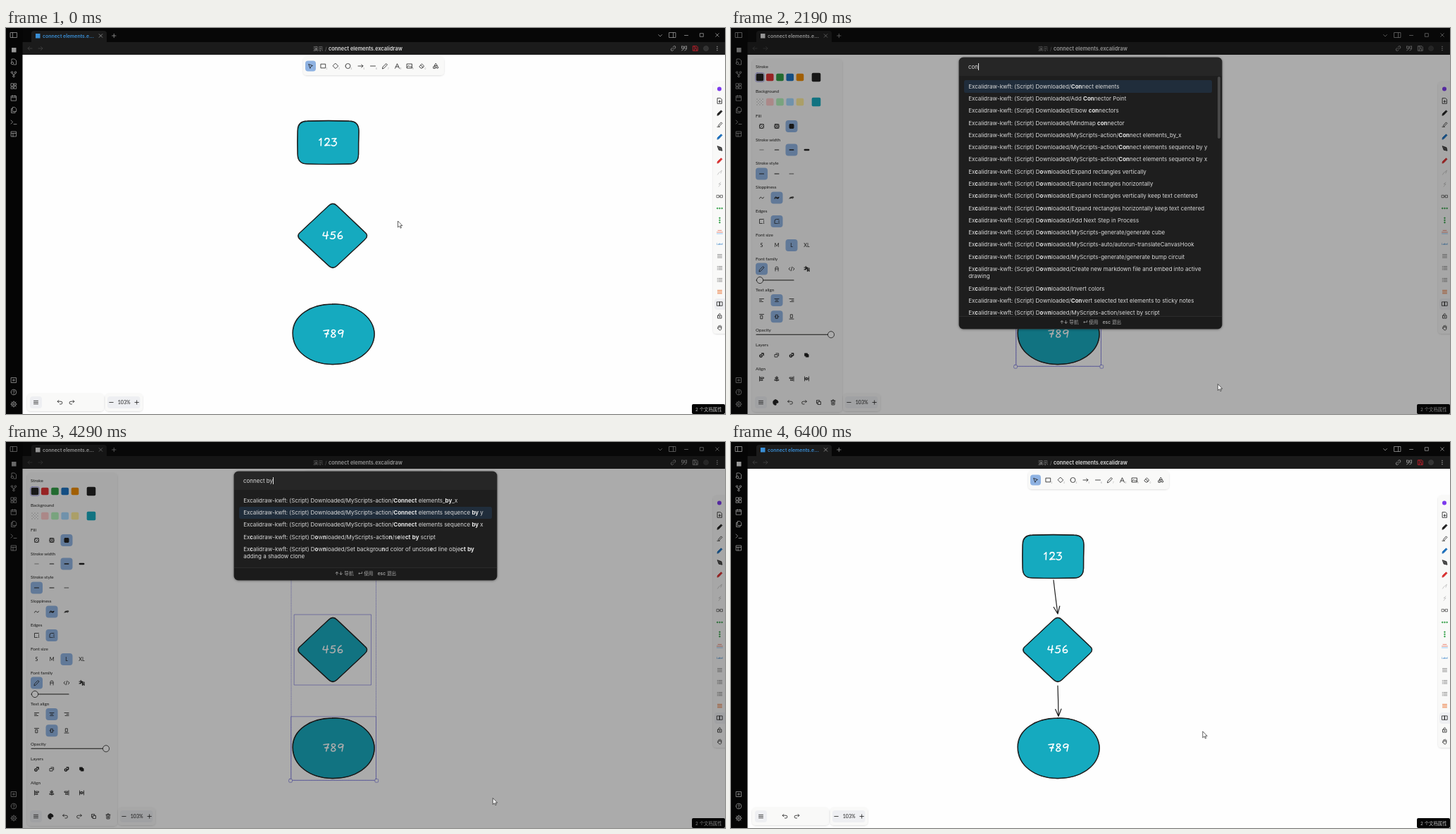
Write an HTML page that moves like this. It is 1021x548 px and loops after 6.78 s.

```html
<!DOCTYPE html>
<html lang="zh">
<head>
<meta charset="utf-8">
<title>connect elements</title>
<style>
html, body { margin: 0; width: 100%; height: 100%; overflow: hidden; background: #fff; }
body { position: relative; font-family: Inter, "Noto Sans CJK SC", "Noto Sans CJK", sans-serif; }
svg { position: absolute; left: 0; top: 0; }
#dim { position: absolute; inset: 0; background: rgba(10, 10, 10, .34); }
#modal { position: absolute; left: 324px; top: 42px; width: 373px; border-radius: 6px; overflow: hidden;
  background: #1e1e1e; color: #dadada; font-size: 7.98px; line-height: 10.4px;
  box-shadow: 0 0 0 .5px #3a3a3a, 0 .5px 3.5px rgba(0, 0, 0, .6); }
#input { height: 25.5px; line-height: 26px; padding-left: 13px; background: #262626; white-space: pre; position: relative; }
#hint { color: #6c6c6c; position: absolute; left: 13px; }
#caret { display: inline-block; width: .7px; height: 10px; margin-top: 8px; background: #e0e0e0; vertical-align: top; }
#list { position: relative; box-sizing: border-box; padding: 6.8px 7px 6.4px; max-height: 341.5px; overflow: hidden; }
#list.scroll { padding-right: 14px; }
.row { padding: 3.45px 6.2px; border-radius: 2.5px; display: flex; }
.row span { flex: 1; }
.row b { font-weight: 700; color: #e6e6e6; }
.row.on { background: #202d3b; }
kbd { font: 500 6.5px/10.4px Inter, sans-serif; background: #151515; border-radius: 2px; padding: 0 2.4px; margin-left: 1.6px; color: #eee; }
#thumb { position: absolute; right: 2px; top: 1.5px; width: 4px; border-radius: 2px; background: #484848; }
#foot { height: 17px; line-height: 17px; font-size: 6.6px; text-align: center; color: #a6a6a6; background: #1b1b1b; border-top: .5px solid #2b2b2b; }
#foot span { margin: 0 2.2px; }
#foot b { font-weight: 600; }
</style>
</head>
<body>
<svg id="app" width="1021" height="548"></svg>
<div id="dim"></div>
<div id="modal">
  <div id="input"><span id="hint">输入命令......</span><span id="query"></span><i id="caret"></i></div>
  <div id="list"></div>
  <div id="foot"><span><b>↑↓</b> 导航</span> <span><b>↵</b> 使用</span> <span><b>esc</b> 退出</span></div>
</div>
<svg width="1021" height="548"><path id="cursor" d="M0 0V9L2.2 7.1L3.7 10.2L5 9.5L3.6 6.6H6.4Z" fill="#fff" stroke="#222" stroke-width=".7"/></svg>
<script>
const LOOP = 6780, ACCENT = '#8eb2e2', INK = '#1e1e1e', TEAL = '#15aabf', VIOLET = '#6965db', BUTTON = '#eeeff2';
const $ = id => document.getElementById(id);

// Drawing helpers; icon paths are centred on 0,0.
const ring = (r, x = 0, y = 0) => `M${x - r} ${y}a${r} ${r} 0 1 0 ${2 * r} 0a${r} ${r} 0 1 0 ${-2 * r} 0`;
const box = (x, y, w, h, fill, r = 0, more = '') => `<rect x="${x}" y="${y}" width="${w}" height="${h}" rx="${r}" fill="${fill}" ${more}/>`;
const icon = (x, y, d, color = INK, w = .8, fill = 'none', flip = 1) =>
  `<path transform="translate(${x} ${y}) scale(${flip} 1)" d="${d}" stroke="${color}" stroke-width="${w}" fill="${fill}"/>`;
const text = (x, y, s, size, fill = INK, more = '') => `<text x="${x}" y="${y + size * .36}" font-size="${size}" fill="${fill}" ${more}>${s}</text>`;
const island = (x, y, w, h) => box(x, y, w, h, '#f9f9f8', 5, 'filter="url(#soft)"');
const group = (id, s) => `<g id="${id}">${s}</g>`;

const SIDE = 'M-4.5-3.5H4.5V3.5H-4.5ZM-1.5-3.5V3.5';
const SQUARE = 'M-2-3H2Q3-3 3-2V2Q3 3 2 3H-2Q-3 3-3 2V-2Q-3-3-2-3Z';
const PENCIL = 'M-3.5 3.5L-3 1.2L2-3.5L3.5-2L-1.2 3Z';
const CROSS = 'M-2.3-2.3L2.3 2.3M2.3-2.3L-2.3 2.3';
const LINES = 'M-3-2.2H3M-3 0H3M-3 2.2H3';
const PLUS = 'M-2.7 0H2.7M0-2.7V2.7';

function chrome() {
  const grey = '#989898';
  let s = box(0, 0, 1021, 38, '#070707') + box(0, 0, 23.5, 548, '#050505') +
    box(23.5, 20, 998, 18, '#1b1b1b') + `<path d="M36 20V8q0-4 4-4H139q4 0 4 4V20Z" fill="#1b1b1b"/>`;
  const ribbon = [
    [10, SIDE],
    [48, 'M-3 1V-4H1L3.5-2V4H0' + ring(1.8, -2, 2)],
    [65.5, ring(1.3, -2.5, -2.5) + ring(1.3, 2.5, -2.5) + ring(1.3, 0, 3) + 'M-2.5-1.2Q-2.5.5 0 .5T2.5-1.2M0 .5V1.7'],
    [82.5, 'M-3.7-3.7H-.6V0H-3.7ZM.8-3.7H3.7V-1.3H.8ZM.8 0H3.7V3.7H.8ZM-3.7 1.4H-.6V3.7H-3.7Z'],
    [99.5, 'M-3.5-3H3.5V3.7H-3.5ZM-3.5-.8H3.5M-1.7-4V-2M1.7-4V-2'],
    [116.5, 'M-1.5-4H1.5L3.7-2V2H-1.5ZM-1.5-2H-3.5V4H2V2'],
    [133.5, 'M-4-2.5L-1.3 0L-4 2.5M0 3H4'],
    [150.5, 'M-3.5-3.5H3.5V3.5H-3.5ZM-3.5-1H3.5M-1-1V3.5'],
    [500, 'M-3.5-3.5H3.5V3.5H-3.5Z' + ring(1.2)],
    [517, ring(3.8) + 'M-1.2-1Q-.8-2.3.5-2T.8-.3L0 .8M0 1.8V2.3'],
    [534, ring(3.2) + ring(1.2) + 'M0-4.2V-3M0 3V4.2M-4.2 0H-3M3 0H4.2M-3-3L-2.2-2.2M3 3L2.2 2.2M3-3L2.2-2.2M-3 3L-2.2 2.2']
  ];
  for (const [y, d] of ribbon) s += icon(11, y, d, grey);
  s += box(8, 28, 6.5, 6.5, grey) + group('tab', box(42, 8, 6.5, 6.5, 'currentColor') +
    text(52, 11.5, 'connect elements.e...', 6.95, 'currentColor', 'font-weight="600"'));
  s += icon(134.5, 11, CROSS, grey) + icon(153.3, 11, PLUS, grey);
  s += icon(929, 10.5, 'M-2.5-1L0 1.5L2.5-1', grey) + icon(946, 10, SIDE, grey, .8, 'none', -1) +
    icon(966, 10.5, 'M-2.5 0H2.5', grey) + icon(988, 10, 'M-2.3-2.3H2.3V2.3H-2.3Z', grey) + icon(1010, 10, CROSS, grey);
  const back = 'M3 0H-3L-.5-2.5M-3 0L-.5 2.5';
  s += icon(34, 29, back, '#444') + icon(49, 29, back, '#444', .8, 'none', -1);
  s += text(436, 29, '演示', 7.2, '#9a9a9a') + text(453, 29, '/', 7.2, '#777') +
    text(458, 29, 'connect elements.excalidraw', 7.4, '#dcdcdc', 'font-weight="600"');
  s += icon(947.5, 29, 'M-1 1L1-1M-.5-2L1-3.4Q3.5-4 3.3-1L2 .5M.5 2L-1 3.4Q-3.5 4-3.3 1L-2-.5', grey) +
    icon(963, 29, 'M-3.5-3H-.7V0Q-1 2.5-3.5 3M-3.5-3V0H-.7M3.5-3H.7V0H3.5M3.5-3V0Q3.5 2.5.7 3', grey) +
    group('save', icon(979, 29, 'M-3.3-3.3H2L3.3-2V3.3H-3.3ZM-1.7 3.3V.5H1.7V3.3M-1.7-3.3V-1.3H1.2', 'currentColor')) +
    icon(994, 29, ring(3.5), '#3c3c3c', .8, '#333') + icon(1010, 29, ring(.4, 0, -2.7) + ring(.4) + ring(.4, 0, 2.7), grey);
  return s + box(974, 534, 47, 14, '#050505', 2) + text(979, 541.3, '2 个文档属性', 6.4, '#bdbdbd');
}

function toolbar() {
  const tools = [
    [432.5, 'M-2.5-2.5L3-.5L.5.5L-.5 3Z'], [450.5, 'M-3.2-2.8H3.2V2.8H-3.2Z'], [468, 'M0-3.7L3.7 0L0 3.7L-3.7 0Z'],
    [485.5, ring(3.5)], [503.5, 'M-3.5 0H3.5L1.3-2M3.5 0L1.3 2'], [521, 'M-3.5 0H3.5'], [538, PENCIL],
    [555.5, 'M-3 3.3L0-3.3L3 3.3M-1.8 1H1.8'], [573, 'M-3.5-3H3.5V3H-3.5ZM-3.5 1.5L-1-.5L1 1.5L2 .5L3.5 2'],
    [590.5, 'M-3.5.5L0-3L3.2 0L.5 3H-1ZM-1.7-1.2L1.7 1.8'], [610.5, 'M0-3.5L2-.5H-2ZM-3.3.8H-.8V3.3H-3.3Z' + ring(1.3, 2, 2)]
  ];
  let s = island(422, 41, 200, 26) + box(425, 46.5, 15, 15, ACCENT, 4);
  tools.forEach(([x, d], i) => {
    s += icon(x, 54, d);
    if (i < 10) s += text(x + 4, 57.5, (i + 1) % 10, 3, '#999');
  });
  return s;
}

function sideTools() {
  const dots = [-3.2, 0, 3.2];
  const bullets = 'M-1.3-2.2H3.3M-1.3 0H3.3M-1.3 2.2H3.3M-3.3-2.2H-2.5M-3.3 0H-2.5M-3.3 2.2H-2.5';
  const items = [
    null, ['M-3-3.8H1L3-2V3.8H-3ZM0-.8V2.4M-1.6.8H1.6', INK], [PENCIL, INK, INK], ['M-3.5 3H0M-2 1L2-3.5L3.5-2L-.5 2Z', INK],
    [PENCIL, '#1864ab', '#1971c2'], ['M-3-3.5L2.5-1.5L3.5 3L-1 2Z' + ring(.8), INK, '#555'], [PENCIL, '#c92a2a', '#e03131'],
    ['M-3 3L-1 0M0-.5L3-3L1.5 1', '#bbb'], ['M1.5-3L-1.5-.5H1.5L-1.5 3', '#bbb'], ['M-4-1.7H-1V1.7H-4ZM1-1.7H4V1.7H1ZM-1 0H1', '#555'],
    [dots.map(v => ring(.8, v, 0)).join(''), '#2f9e44', '#2f9e44'], [dots.map(v => ring(.8, 0, v)).join(''), '#2f9e44', '#2f9e44'],
    ['M-2.5-2.5H2.5M-4 0H4', '#e8705a'], null, [LINES, '#777'], [bullets, '#777'], [bullets, '#777'],
    [LINES, '#e8590c'], ['M-3.7-2.7H0V2.7H-3.7ZM0-2.7H3.7V2.7H0Z', INK],
    ['M-2.5-.5H2.5V3.5H-2.5ZM-1.5-.5V-2Q0-4.5 1.5-2' + ring(.4, 0, 1.5), INK],
    ['M-2.5.5V-1.5M-1-.5V-3M.7-.5V-3.4M2.3 0V-2.3M-2.5.5Q-4 0-2 2Q-1 3.5 1 3.4Q3 3 2.3 0', INK]
  ];
  let s = island(1004, 76, 24, 358) + box(1006, 384, 17, 16, BUTTON, 4) + `<circle cx="1013" cy="86.5" r="3" fill="#7c3aed"/>`;
  items.forEach((it, i) => { if (it) s += icon(1013.5, 86.5 + i * 16.95, it[0], it[1], .8, it[2]); });
  return s + text(1009, 307, 'Label', 3.4, '#1971c2') + icon(1013.5, 290, 'M-4 2H4', '#4dabf7', .6);
}

function panel() {
  const cols = [43.5, 65, 86, 107.5];
  const label = (y, s) => text(35, y, s, 6.35, INK, 'font-family="Lato, sans-serif"');
  const wave = 'M-3 1.2Q-1.5-2.5 0 0T3-.8', dash = 'M-3 0h1.6m.7 0h1.6m.7 0h1.4', dotty = 'M-3 0h.6m.7 0h.6m.7 0h.6m.7 0h.6m.7 0h.6';
  const hatch = 'M-3 0L0-3M-2.5 2.5L2.5-2.5M0 3L3 0', cross = hatch + 'M-2.5-2.5L2.5 2.5M0-3L3 0M-3 0L0 3';
  const arm = 'M-3 3V-3H3', arc = 'M-3 3V-.5Q-3-3-.5-3H3', rest = 'M3-1V0M3 1.5V3M1 3H0M-1 3H-2';
  const duo = ring(1.7, -1, 1) + 'M0-2.5H2.7V.3';
  const sections = [
    ['Fill', 124.5, 139.5, 2, [[SQUARE + hatch], [SQUARE + cross], [SQUARE, 1, INK]]],
    ['Stroke width', 158.5, 173, 2, [['M-2.7 0H2.7', .5], ['M-2.7 0H2.7', 1.2], ['M-2.7 0H2.7', 1.6], ['M-2.7 0H2.7', 2.5]]],
    ['Stroke style', 192, 207, 0, [['M-3 0H3', 1.1], [dash, 1], [dotty, .7]]],
    ['Sloppiness', 226, 241, 1, [[wave], [wave + 'L-1 .8', 1.1], [wave + 'Q-1-2-2 1L2-1', .9]]],
    ['Edges', 260, 274.5, 1, [[arm + rest], [arc + rest]]],
    ['Font size', 293.5, 308.5, 2, ['S', 'M', 'L', 'XL']],
    ['Font family', 327.5, 342, 0, [[PENCIL], ['M-2 3V-1.5Q-2-3 0-3T2-1.5V3M-2 0H2'], ['M-2.2-2L-4 0L-2.2 2M2.2-2L4 0L2.2 2M.8-2.8L-.8 2.8'], ['M-3.5-2H1M-1.2-3.8V1M-3.5 1Q0 0 .5-2M1 0L3.5 3.5M1 3.5V-1H3.5V3', 1.1]]],
    ['Text align', 372, 386.5, 1, [['M-3-2H3M-3 0H0M-3 2H2'], ['M-3-2H3M-1.5 0H1.5M-2.3 2H2.3'], ['M-3-2H3M0 0H3M-2 2H3']]],
    ['', 0, 409.8, 1, [['M-3-3.3H3M-1.3-1.5H1.3V3H-1.3Z'], ['M-3 0H-1.3M1.3 0H3M-1.3-2.5H1.3V2.5H-1.3Z'], ['M-3 3.3H3M-1.3-3H1.3V1.5H-1.3Z']]],
    ['Layers', 450, 464.5, -1, [[duo, 1.3], ['M-2.6-1H1V2.6H-2.6ZM-1-2.6H2.6V1'], [duo + 'L0 1', 1.3], ['M-1-1H2.6V2.6H-1ZM-2.6-2.6H1V1H-2.6Z', .8, INK]]],
    ['Align', 483.5, 498, -1, [['M-3-3.3V3.3M-1.5-2H3V-.5H-1.5ZM-1.5 1H1.5V2.3H-1.5Z'], ['M0-3.5V3.5M-1.7-2H1.7V-.6H-1.7ZM-2.7 1H2.7V2.4H-2.7Z'], ['M3-3.3V3.3M1.5-2H-3V-.5H1.5ZM1.5 1H-1.5V2.3H1.5Z'], ['M-3-3V3M3-3V3M-1.2-1.5H1.2V1.5H-1.2ZM-3 0H3']]]
  ];
  let s = island(30, 44, 128, 501) + label(55, 'Stroke') + label(90, 'Background') + label(429, 'Opacity');
  const swatches = (y, colors) => colors.forEach((c, i) => {
    const big = i == 5, half = big ? 6.3 : 5.3;
    s += box((big ? 121 : 41 + i * 14.25) - half, y - half, half * 2, half * 2, c, 2);
  });
  swatches(70, [INK, '#e03131', '#2f9e44', '#1971c2', '#f08c00', INK]);
  s += box(34.7, 63.7, 12.6, 12.6, 'none', 2.5, `stroke="${VIOLET}" stroke-width=".6"`);
  swatches(105, ['url(#check)', '#ffc9c9', '#b2f2bb', '#a5d8ff', '#ffec99', TEAL]);
  for (const [name, ly, y, on, icons] of sections) {
    if (name) s += label(ly, name);
    if (on >= 0) s += box(cols[on] - 8.5, y - 8.5, 17, 17, ACCENT, 4);
    icons.forEach((it, i) => s += typeof it == 'string'
      ? text(cols[i], y, it, 7.2, INK, 'text-anchor="middle" font-family="Lato, sans-serif"')
      : icon(cols[i], y, it[0], INK, it[1], it[2]));
  }
  for (const [y, end, knob] of [[358, 89, 41], [435.3, 146, 142]])
    s += icon(0, y, `M36 0H${end}`, INK, 1.1) + icon(knob, y, ring(4.6), INK, .8, '#fff');
  return s;
}

function footer(undo, redo, zoom) {
  const turn = 'M-1.7-3L-3.3-1.3L-1.7.4M-3.3-1.3H1.5a1.9 1.9 0 0 1 0 3.8H0';
  return island(zoom, 519, 53, 25) + box(zoom + 3, 523, 46.5, 17, BUTTON, 4) + box(34, 523, 17, 17, BUTTON, 4) +
    icon(undo, 531.5, turn) + icon(redo, 531.5, turn, INK, .8, 'none', -1) +
    icon(42.5, 531.5, LINES) + icon(zoom + 8.5, 531.5, 'M-2.7 0H2.7') + icon(zoom + 44.7, 531.5, PLUS) +
    text(zoom + 26.7, 531.8, '103%', 7, INK, 'text-anchor="middle" font-family="Lato, sans-serif"');
}

// Handwritten digits, about 8 by 12 units each.
const DIGITS = {
  1: 'M2 3L5 .3L4.6 11.5', 2: 'M.5 3C1-.8 7-.8 7 3C7 6 3 9 .3 11.3C3 10.3 5 10.6 8 11',
  3: 'M1 .8L7.5.3L3.5 5C8 4 9 8 7 10C5 12 2 12 0 10.5', 4: 'M1.8 1.5L0 6.3C3 7.2 6 6.5 8.3 6M7 .3L5.4 11.5',
  5: 'M8 .5L2.7 1L1.7 5C5 3.5 8 5 7.5 8C7 12 2 12 0 10.3', 6: 'M6 .2C2 2 0 6 1 9.3C2 12.5 8 11.5 7.6 8.4C7 5.5 3 6 1 8.5',
  7: 'M0 1.5C3 1 5 1 8 .5C6 4 4.5 8 4 11.5M2 6.3H7.5', 8: 'M7 2C5-.8 0 0 1.5 3.5C3 6 8 7 7 9.8C6 12.5 0 12 .5 9.3C1 6.5 7 5 7 2',
  9: 'M8 2C5-1 0 1 .5 4.5C1 7.5 6.5 6 8 2L7.3 5.5Q6.5 9 6 11.5'
};
const digits = (x, y, step, s) => [...s].map((c, i) =>
  `<path transform="translate(${x + i * step} ${y}) scale(.92)" d="${DIGITS[c]}" stroke="#fff" stroke-width="1.7" fill="none"/>`).join('');

function shapes() {
  const rough = (d, dx, dy) => `<path d="${d}" fill="${TEAL}" stroke="${INK}" stroke-width="1.3"/>
    <path d="${d}" fill="none" stroke="${INK}" stroke-width=".8" transform="translate(${dx} ${dy})"/>`;
  return rough('M428 132Q458 131 487 132Q501 132 501 146Q500.4 163 500.5 179Q500.5 193 487 193Q457 193.8 428 192.8Q414 193 414 179Q413.5 162 414 146Q414 132 428 132Z', .3, .4) +
    rough('M458 252.5Q464 246.5 470 252.5L509 289.5Q516 295 509 301L470 337.5Q464 343.5 458 337.5L418.5 301Q411 295 418.5 289.5Z', .3, -.4) +
    rough('M463 392C496 390 523 411 523 435C522 461 495 478 463 477.5C431 477 407 459 407 433C407 409 432 392 463 392Z', .5, .2) +
    digits(443, 156.5, 9.5, '123') + digits(450, 288.8, 10.3, '456') + digits(451, 428.3, 10.3, '789');
}
const arrows = ['M458 196Q460.5 218 464 244M458.2 234.5L464 244L466.8 233', 'M464 346Q464.8 368 465 389.5M460.7 379.5L465 389.5L469 379']
  .map(d => `<path d="${d}" fill="none" stroke="${INK}" stroke-width="1.2"/>`).join('');

$('app').innerHTML = `<defs>
  <filter id="soft" x="-10%" y="-20%" width="120%" height="140%"><feDropShadow dx="0" dy=".8" stdDeviation="1.2" flood-opacity=".14"/></filter>
  <pattern id="check" width="4" height="4" patternUnits="userSpaceOnUse"><path d="M0 0H4V4H0Z" fill="#fff"/><path d="M0 0H2V2H0ZM2 2H4V4H2Z" fill="#ddd"/></pattern></defs>
  <g stroke-linecap="round" stroke-linejoin="round">` +
  box(0, 0, 1021, 548, '#fefefe') + shapes() + group('arrows', arrows) + group('sel', '') +
  box(348.5, 94.5, 0, 0, 'rgba(0,0,200,.04)', 0, `id="marquee" stroke="${VIOLET}" stroke-width=".6"`) +
  toolbar() + sideTools() +
  group('idle', island(30, 519, 109, 25) + footer(76.5, 93.5, 141)) +
  group('active', panel() + footer(84, 104, 159) +
    icon(63.3, 531.5, 'M0-3.8A3.8 3.8 0 1 0 .5 3.8Q1.5 3 .7 2Q.5.8 2 .9Q4 1 3.8-.6Q3.2-3.6 0-3.8Z', INK, .8, INK) +
    icon(124.5, 531.5, 'M-1-1H3V3H-1ZM-1 1.3H-3V-3H1.3V-1') + icon(145, 531.5, 'M-3-2.3H3M-2.3-2.3L-2 3.5H2L2.3-2.3M-1-2.5V-3.6H1V-2.5M-.7-.5V2M.7-.5V2')) +
  chrome() + '</g>';

const BOXES = [[411.5, 129.5, 91, 66], [409.5, 245, 109, 100], [405, 389.8, 120.5, 90.5]];
function selection(n, settled) {
  const line = `stroke="${VIOLET}" stroke-width=".6"`, picked = BOXES.slice(0, n);
  let s = picked.map(b => box(...b, 'none', 0, line)).join('');
  if (n < 2) return s;
  const l = Math.min(...picked.map(b => b[0])), r = Math.max(...picked.map(b => b[0] + b[2]));
  const t = BOXES[0][1] - .5, b = picked[n - 1][1] + picked[n - 1][3];
  s += box(l, t, r - l, b - t, 'none', 0, `stroke="${VIOLET}" stroke-width=".9" stroke-dasharray="1 1.2" stroke-linecap="butt"`);
  if (settled) {
    for (const x of [l - 1, r + .8]) for (const y of [t - .4, b + .5]) s += box(x - 2.4, y - 2.4, 4.8, 4.8, '#fff', 1.3, line);
    s += icon((l + r) / 2, 120, ring(2.3), VIOLET, .7, '#fff');
  }
  return s;
}

// Command palette
const COMMANDS = `保存当前文件|Ctrl + S
解锁/锁定
左右分屏
上下分屏
堆叠/取消堆叠标签页
编辑文件名|F2
复制当前文件的路径
复制 Tolvaria 链接
重新打开标签页|Ctrl + Shift + T
在新窗口中打开当前面板
将当前面板移动至新窗口
转到下一个标签|Ctrl + Tab|Ctrl + Page Down
转到标签 #1|Ctrl + 1
转到最后一个标签|Ctrl + 9
转到上一个标签|Ctrl + Shift + Tab|Ctrl + Page Up
新标签页|Ctrl + T
Kanban: 创建新看板
Banners: Add/Change banner with local image
Banners: Add/Change emoji icon
Banners: Paste banner from clipboard`.split('\n');
const SCRIPTS = `Connect elements
Add Connector Point
Elbow connectors
Mindmap connector
MyScripts-action/Connect elements_by_x
MyScripts-action/Connect elements sequence by y
MyScripts-action/Connect elements sequence by x
Expand rectangles vertically
Expand rectangles horizontally
Expand rectangles vertically keep text centered
Expand rectangles horizontally keep text centered
Add Next Step in Process
MyScripts-generate/generate cube
MyScripts-auto/autorun-translateCanvasHook
MyScripts-generate/generate bump circuit
Create new markdown file and embed into active drawing
Invert colors
Convert selected text elements to sticky notes
MyScripts-action/select by script
Set background color of unclosed line object by adding a shadow clone
Normalize Selected Arrows
Change shape of selected elements
Invert selected frame contents`.split('\n').map(s => 'Excalidraw-kwft: (Script) Downloaded/' + s);

// Each word matches as a whole, or else letter by letter in order; null means no match.
function highlight(item, query) {
  const low = item.toLowerCase(), hits = new Set();
  for (const word of query.split(' ').filter(Boolean)) {
    let pos = Math.max(0, low.indexOf(word));
    for (const ch of word) {
      pos = low.indexOf(ch, pos);
      if (pos < 0) return null;
      hits.add(pos++);
    }
  }
  return [...item].map((c, i) => hits.has(i) ? `<b>${c}</b>` : c).join('').replace(/<\/b><b>/g, '');
}
function showPalette(query, picked) {
  const rows = query ? SCRIPTS.map(s => highlight(s, query)).filter(Boolean).map(s => `<span>${s}</span>`)
    : COMMANDS.map(c => c.split('|').map((p, i) => i ? `<kbd>${p}</kbd>` : `<span>${p}</span>`).join(''));
  const long = rows.length > 9;
  $('list').className = long ? 'scroll' : '';
  $('list').innerHTML = rows.map((r, i) => `<div class="row${i == picked ? ' on' : ''}">${r}</div>`).join('') +
    (long ? `<div id="thumb" style="height:${64 + 8.1 * query.length}px"></div>` : '');
  $('query').textContent = query;
  $('hint').style.display = query ? 'none' : '';
}

// Timeline: values hold until the next step.
const POINTER = [[0, 556.5, 274], [100, 470, 205], [194, 395, 132], [289, 348.5, 94.5], [383, 400, 150], [477, 510, 262],
  [571, 578, 372], [666, 650, 484], [760, 690, 524], [860, 691.5, 522], [950, 691.5, 514], [1040, 691.3, 505.5],
  [5350, 688, 480], [5447, 679, 440], [5543, 671, 410], [5640, 667.5, 397.5], [5830, 667, 405], [5927, 666.5, 412], [6400, 669.8, 410.8]];
const PICKED = [[0, 0], [477, 1], [571, 2], [666, 3], [5927, 0]];
const TYPED = [[0, 0], [1810, 1], [1910, 2], [2190, 3], [2287, 4], [2383, 5], [2480, 6], [2760, 7], [2960, 8], [3150, 9], [3240, 10]];
const at = (steps, t) => steps.filter(s => s[0] <= t).pop();
const show = (id, on) => $(id).style.display = on ? '' : 'none';
const during = (t, a, b) => t >= a && t < b;

let selKey, listKey;
function draw(t) {
  const [, x, y] = at(POINTER, t), n = at(PICKED, t)[1], open = during(t, 1620, 4570);
  $('cursor').setAttribute('transform', `translate(${x} ${y})`);
  show('marquee', during(t, 383, 950));
  $('marquee').setAttribute('width', Math.max(0, x - 348.5));
  $('marquee').setAttribute('height', Math.max(0, y - 94.5));
  show('active', n); show('idle', !n); show('arrows', t >= 4570);
  show('dim', open); show('modal', open);
  $('save').style.color = open ? '#989898' : '#d0202c';
  $('tab').style.color = open ? '#dcdcdc' : '#3a8fd6';
  $('caret').style.opacity = during(t, 3820, 4190) ? 0 : 1;
  const sk = n + '/' + (t >= 950);
  if (sk != selKey) { selKey = sk; $('sel').innerHTML = selection(n, t >= 950); }
  const query = 'connect by'.slice(0, at(TYPED, t)[1]), row = t >= 4290 ? 1 : 0;
  if (query + row != listKey) { listKey = query + row; showPalette(query, row); }
}
const start = performance.now();
function tick() {
  draw((performance.now() - start) % LOOP);
  requestAnimationFrame(tick);
}
tick();
</script>
</body>
</html>
```
